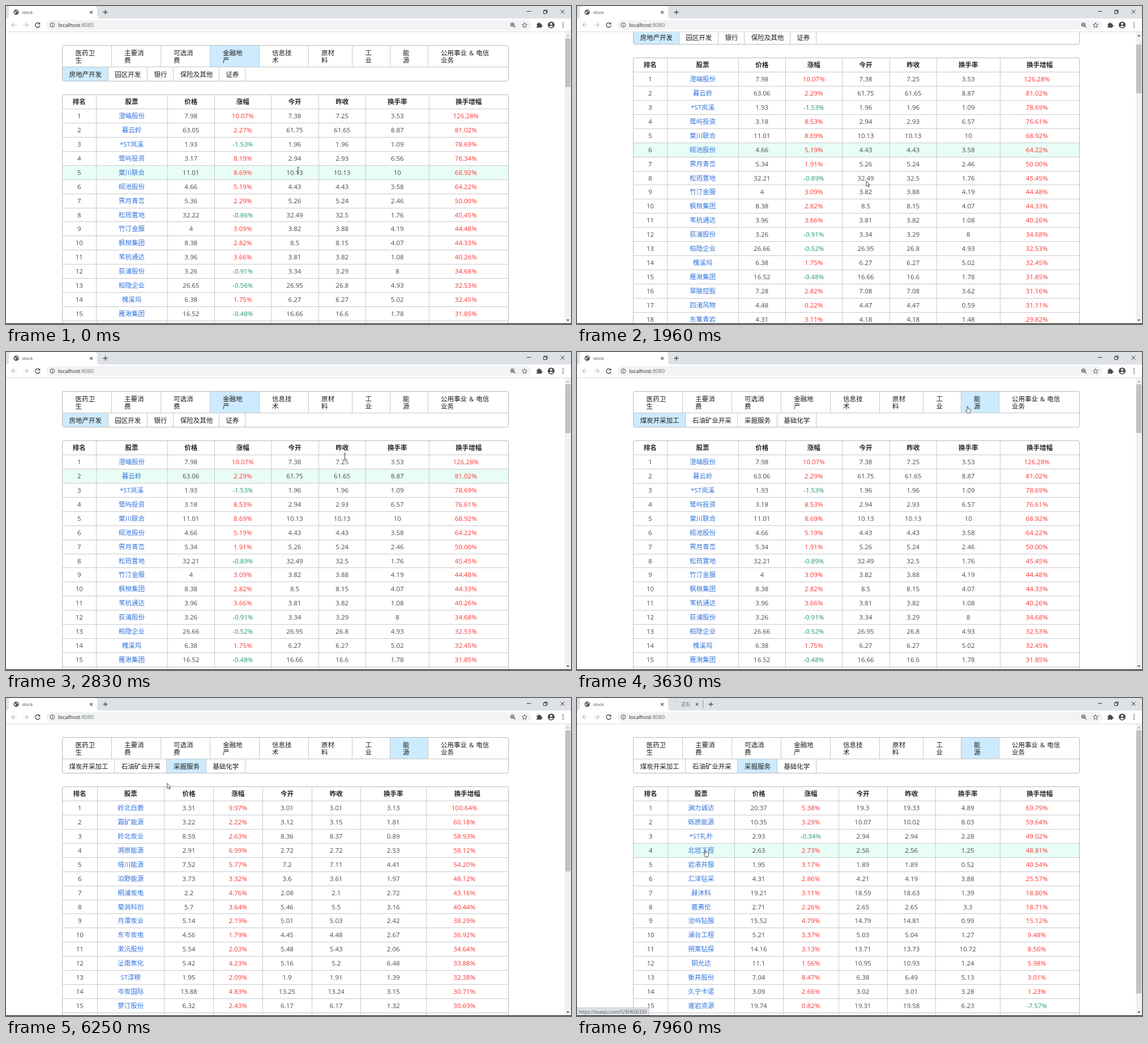
Write an HTML page that moves like this. It is 998 px wide and 561 px high and loops after 8000 ms.

```html
<!DOCTYPE html>
<html lang="zh-CN">
<head>
<meta charset="utf-8">
<title>stock</title>
<style>
html, body { margin: 0; width: 100%; height: 100%; overflow: hidden; background: #fff; }
* { box-sizing: border-box; }
#stage { position: absolute; left: 0; top: 0; width: 998px; height: 561px; overflow: hidden; background: #fff;
  font: 11.5px/24px "Open Sans", "Noto Sans CJK SC", "Noto Sans CJK", sans-serif; color: #4a4a4a; white-space: nowrap; }
#stage > *, #page > *, .panel { position: absolute; }
svg { left: 0; top: 0; overflow: visible; }
#view { left: 0; top: 46px; width: 987px; height: 514px; overflow: hidden; }
#page { position: absolute; left: 0; top: -46px; width: 987px; height: 700px; }
#nav, .panel { left: 99px; width: 789px; border: 1px solid #b9b9b9; border-radius: 3px; overflow: hidden; }
#nav { top: 69px; height: 64px; color: #1c1c1c; }
#tabs { display: grid; height: 38px; border-bottom: 1px solid #c6c6c6; line-height: 13px; word-spacing: 1px; }
#tabs div { padding: 6px 0 0 22.5px; border-right: 1px solid #c6c6c6; }
#tabs div:last-child { border: 0; }
.subs { display: flex; height: 24px; line-height: 25px; }
.subs div { padding: 0 11.6px; box-shadow: inset -1px 0 #c6c6c6; }
#nav .on { background: #cdebff; }
.panel { top: 156px; height: 520px; }
.row { display: grid; height: 24.94px; border-bottom: 1px solid #cacaca; text-align: center; }
.row div { border-right: 1px solid #cacaca; }
.row div:last-child { border: 0; }
.row.hover { background: #e8fdf6; }
.head { font-weight: 700; color: #262626; }
.row:not(.head) div:last-child { padding-right: 10px; }
.link { color: #3273dc; }
.up { color: #ff3333; }
.down { color: #209869; }
#bar { left: 987px; top: 46px; width: 11px; height: 514px; background: #f1f1f1; }
#thumb { position: absolute; left: 1px; width: 9px; background: #c1c1c1; }
#status { left: 0; top: 546px; width: 128px; height: 14px; padding-left: 3px; background: #dee1e6;
  border: solid #c3c6ca; border-width: 1px 1px 0 0; border-radius: 0 3px 0 0; font-size: 8.1px; line-height: 13px; color: #50545a; }
#floor { left: 0; top: 560px; width: 998px; height: 1px; background: #000; }
#fresh { left: 163px; top: 4px; height: 14px; overflow: hidden; border-right: 1px solid #8b8f94; }
#fresh span { position: absolute; left: 21px; width: 19px; overflow: hidden; font-size: 8.3px; line-height: 14px; color: #50545a;
  -webkit-mask: linear-gradient(90deg, #000 55%, transparent); mask: linear-gradient(90deg, #000 55%, transparent); }
#fresh svg { position: absolute; }
</style>
</head>
<body>
<div id="stage">
  <div id="view"><div id="page">
    <div id="nav"><div id="tabs"></div></div>
  </div></div>
  <div id="bar"><div id="thumb"></div></div>

  <svg width="998" height="561" fill="none" stroke="#45494d" stroke-width="1.1">
    <g stroke="none">
      <path d="M0 0H998V22H0Z" fill="#dee1e6"/>
      <path d="M0 22Q5 22 5 17V5Q5 0 10 0H156Q161 0 161 5V17Q161 22 166 22V46H0Z" fill="#fff"/>
      <path d="M0 22H998V45H0Z" fill="#fff"/>
      <path d="M0 45H998V46H0Z" fill="#d9dbde"/>
      <rect x="71" y="25" width="857" height="17" rx="8.5" fill="#f1f3f4"/>
      <circle cx="18" cy="11" r="4.7" fill="#565a5f"/>
      <path d="M14.5 9.5Q17 9 17.5 11T15.5 13.5ZM18 7.5Q21 8 21.3 10.5L19 10Z" fill="#e6e8ea"/>
      <text x="28.5" y="14" font-size="7.9" fill="#45494d">stock</text>
      <text x="92" y="37" font-size="9.35" fill="#202124">localhost<tspan fill="#6b7075">:8080</tspan></text>
    </g>
    <path d="M148.3 9l4.6 4.6M152.9 9l-4.6 4.6"/>
    <path id="plus" d="M-4 0H4M0 -4V4" stroke-width="1.3"/>
    <path d="M920 9.5h7.5M949.5 8.5h5v5h-5ZM951 8.5V7h5v5h-1.5M979.5 6.5l7 7M986.5 6.5l-7 7" stroke="#333" stroke-width="1"/>
    <path d="M18.5 33.5H10M14 29.5l-4 4 4 4M30.5 33.5H39M35 29.5l4 4-4 4" stroke="#bcbfc3"/>
    <path d="M59.3 31.2A4.1 4.1 0 1 0 60 34.5" stroke-width="1.3"/>
    <path d="M60.3 28.8V32.6H56.5Z" fill="#45494d" stroke="none"/>
    <circle cx="81.8" cy="33.5" r="3.9" stroke-width="1"/>
    <path d="M81.8 33V35.8M81.8 31.1V32.1"/>
    <circle cx="894.5" cy="32.7" r="3"/>
    <path d="M896.7 34.9l3 3M893 32.7h3M894.5 31.2v3"/>
    <path d="M916 29.3l1.3 2.8 3.1.4-2.3 2.1.6 3.1-2.7-1.5-2.7 1.5.6-3.1-2.3-2.1 3.1-.4Z" stroke-width=".9"/>
    <g fill="#45494d" stroke="none">
      <path d="M937.5 31h2.7a1.5 1.5 0 1 1 2.9 0h2.4v2.5a1.5 1.5 0 1 1 0 2.8v2.2h-2.6a1.4 1.4 0 0 0-2.7 0h-2.7v-2.6a1.4 1.4 0 0 0 0-2.7Z"/>
      <circle cx="963" cy="33.5" r="6"/>
      <circle cx="984" cy="29.8" r="1"/><circle cx="984" cy="33.5" r="1"/><circle cx="984" cy="37.2" r="1"/>
      <g fill="#fff"><circle cx="963" cy="31.6" r="2"/><path d="M959.2 36.6Q963 33 966.8 36.6Q963 39.5 959.2 36.6Z"/></g>
      <path id="upArrow" d="M990 53.5h5l-2.5-3Z"/>
      <path d="M990 553h5l-2.5 3Z"/>
    </g>
  </svg>

  <div id="fresh"><span>正在加载</span>
    <svg width="60" height="14" fill="none" stroke="#45494d">
      <path d="M9 2.5Q10 1.7 11 1.8" stroke="#8b8f94"/>
      <path id="freshClose" d="M46.7 4.7l4.6 4.6M51.3 4.7l-4.6 4.6" stroke-width="1.1"/>
    </svg>
  </div>
  <div id="status"></div>
  <div id="floor"></div>
  <svg width="998" height="561"><g id="cursor" stroke-linejoin="round">
    <path data-kind="arrow" d="M0 0V9L2.1 7.1 3.6 10.5 5 9.9 3.6 6.6H6.3Z" fill="#fff" stroke="#222" stroke-width=".8"/>
    <path data-kind="text" d="M-2 -5H2M0 -5V5M-2 5H2" fill="none" stroke="#333" stroke-width=".9"/>
    <path data-kind="hand" d="M-.9 .8Q0 -.4 .9 .8V4.5Q2 3.8 2.6 4.8 3.6 4.3 4 5.3 5.2 5 5.3 6.2V9Q5 10.5 4.3 12.5H-.6Q-1.8 9.8 -3.2 7.8-3 6.4-.9 7.9Z" fill="#fff" stroke="#222" stroke-width=".8"/>
  </g></svg>
</div>

<script>
const $ = id => document.getElementById(id);
const LEFT = 100, TOP = 181, PITCH = 24.94, FRAMES = 192;

const tabNames = ['医药卫|生', '主要消|费', '可选消|费', '金融地|产', '信息技|术', '原材|料', '工|业', '能|源', '公用事业 &amp; 电信|业务'];
const tabEdges = [186.5, 273.5, 360.5, 447.5, 534.5, 612, 678.5, 745.5, 887];
const subNames = ['房地产开发 园区开发 银行 保险及其他 证券', '煤炭开采加工 石油矿业开采 采掘服务 基础化学'];
const heads = '排名 股票 价格 涨幅 今开 昨收 换手率 换手增幅'.split(' ');

// Each row: name, price, open, previous close, turnover, turnover growth; "a>b" is a live update.
const estate = `澄岫股份 7.98 7.38 7.25 3.53 126.28
暮云岭 63.05>63.06 61.75 61.65 8.87 81.02
*ST岚溪 1.93 1.96 1.96 1.09 78.69
鹭屿投资 3.17>3.18 2.94 2.93 6.56>6.57 76.34>76.61
棠川联合 11.01 10.13 10.13 10 68.92
砚池股份 4.66 4.43 4.43 3.58 64.22
霁月青峦 5.36>5.34 5.26 5.24 2.46 50.00
松筠置地 32.22>32.21 32.49 32.5 1.76 45.45
竹汀金服 4 3.82 3.88 4.19 44.48
枫桓集团 8.38 8.5 8.15 4.07 44.33
苇杭通达 3.96 3.81 3.82 1.08 40.26
荻浦股份 3.26 3.34 3.29 8 34.68
柏隐企业 26.65>26.66 26.95 26.8 4.93 32.53
槐溪坞 6.38 6.27 6.27 5.02 32.45
雁湫集团 16.52 16.66 16.6 1.78 31.85
翠陂控股 7.28 7.08 7.08 3.62 31.16
四渚风物 4.48 4.47 4.47 0.59 31.11
东篱青岩 4.31 4.18 4.18 1.48 29.82`;
const coal = `岭北白鹿 3.31 3.01 3.01 3.13 100.64
霜矿能源 3.22 3.12 3.15 1.81 60.18
岭北炭业 8.59 8.36 8.37 0.89 58.93
溯原能源 2.91 2.72 2.72 2.53 58.12
绮川能源 7.52 7.2 7.11 4.41 54.20
泊野能源 3.73 3.6 3.61 1.97 48.12
桐浦炭电 2.2 2.08 2.1 2.72 43.16
菊涧科创 5.7 5.46 5.5 3.16 40.44
月潭炭业 5.14 5.01 5.03 2.42 38.29
东岑炭电 4.56 4.45 4.48 2.67 36.92
漱沅股份 5.54 5.48 5.43 2.06 34.64
沚南焦化 5.42 5.16 5.2 6.48 33.88
ST淳穆 1.95 1.9 1.91 1.39 32.38
岑炭国际 13.88 13.25 13.24 3.15 30.71
蓼汀股份 6.32 6.17 6.17 1.32 30.69`;
const drilling = `渊力诚达 20.37 19.3 19.33 4.89 69.79
砾原能源 10.35 10.07 10.02 8.03 59.64
*ST礼朴 2.93 2.94 2.94 2.28 49.02
北垣工程 2.63 2.56 2.56 1.25 48.81
岩液井服 1.95 1.89 1.89 0.52 40.54
汇泽钻采 4.31 4.21 4.19 3.88 25.57
赫沐科 19.21 18.59 18.63 1.39 18.80
嘉弗伦 2.71 2.65 2.65 3.3 18.71
沧屿钻服 15.52 14.79 14.81 0.99 15.12
澜台工程 5.21 5.03 5.04 1.27 9.48
朔莱钻探 14.16 13.71 13.73 10.72 8.50
铜允达 11.1 10.95 10.93 1.24 5.98
衡井股份 7.04 6.38 6.49 5.13 3.01
久宁卡诺 3.09 3.02 3.01 3.28 1.23
邃岩资源 19.74 19.31 19.58 6.23 -7.57`;
const estateEdges = [159.5, 285.5, 369, 468.5, 552.5, 636, 747.5, 887];
const coalEdges = [161.5, 280, 367, 453.5, 540.5, 627, 742.5, 887];
const drillingEdges = [161, 278.5, 364.5, 462.5, 548.5, 634, 747.5, 887];

const columns = edges => edges.map((e, i) => e - (edges[i - 1] || LEFT) + 'px').join(' ');

function add(parent, cls, html = '') {
  const el = document.createElement('div');
  el.className = cls;
  el.innerHTML = html;
  return parent.appendChild(el);
}

function makeTable(text, edges, updated) {
  const panel = add($('page'), 'panel');
  const addRow = (cells, cls) => {
    const row = add(panel, cls);
    row.style.gridTemplateColumns = columns(edges);
    cells.forEach(([value, kind]) => add(row, kind || '', value));
    return row;
  };
  const tint = v => [v + '%', v < 0 ? 'down' : 'up'];
  const head = addRow(heads.map(h => [h]), 'row head');
  const rows = text.split('\n').map((line, i) => {
    const [name, price, open, prev, turn, growth] =
      line.split(' ').map(v => v.split('>')[updated && v.includes('>') ? 1 : 0]);
    const change = ((price / prev - 1) * 100).toFixed(2);
    return addRow([[i + 1], [name, 'link'], [price], tint(change), [open], [prev], [turn], tint(growth)], 'row');
  });
  addRow(heads.map(() => ['']), 'row');
  return { panel, head, rows, edges };
}

const tables = [
  makeTable(estate, estateEdges, false),
  makeTable(estate, estateEdges, true),
  makeTable(coal, coalEdges),
  makeTable(drilling, drillingEdges)
];
const thumbHeights = [86, 86, 249, 464];

$('tabs').style.gridTemplateColumns = columns(tabEdges);
const tabs = tabNames.map(n => add($('tabs'), '', n.replace('|', '<br>')));
const subs = subNames.map(names => {
  const bar = add($('nav'), 'subs');
  names.split(' ').forEach(n => add(bar, '', n));
  return bar;
});

// Pointer path: frame (24 per second), x, y
const path = [
  [0, 516, 290], [9, 516, 290], [13, 513, 291], [16, 513, 291], [19, 511, 307], [22, 511, 308.8],
  [60, 511, 308.8], [64, 548, 245], [66, 575, 212], [68, 598.5, 184], [77, 708, 92], [83, 706, 90],
  [86, 706, 90], [95, 560, 140], [106, 328, 178], [109, 324, 180.7], [118, 296, 200], [126, 248, 220],
  [129, 226, 219], [133, 226, 219], [142, 316, 124], [145, 305, 124], [147, 305, 124],
  [150, 284.7, 150.5], [167, 252, 242], [180, 227, 267.5]
];

function pointer(f) {
  const i = path.findIndex(k => k[0] > f);
  if (i < 0) return path[path.length - 1].slice(1);
  if (i === 0) return path[0].slice(1);
  const [f0, x0, y0] = path[i - 1], [f1, x1, y1] = path[i];
  const p = (f - f0) / (f1 - f0);
  return [x0 + (x1 - x0) * p, y0 + (y1 - y0) * p];
}

const ease = p => { p = Math.min(1, Math.max(0, p)); return p * p * (3 - 2 * p); };
const scrollAt = f => 65 * (ease((f - 41) / 6) - ease((f - 57) / 6));
// Hover is only re-evaluated some time after the wheel stops.
const settledScroll = f => f >= 54 && f < 64 ? 65 : 0;
const rowAt = (y, f) => Math.floor((y + settledScroll(f) - TOP) / PITCH);

function pointerKind(f, table) {
  const [x, y] = pointer(f - 1);
  if (y > 69 && y < 133) return 'hand';
  const r = rowAt(y, f);
  const row = r === -1 ? table.head : table.rows[r];
  if (!row) return 'arrow';
  const c = table.edges.findIndex(e => e > x);
  if (c < 0) return 'arrow';
  const half = row.children[c].textContent.replace(/[^\x00-\xff]/g, 'aa').length * 2.9;
  const midX = ((table.edges[c - 1] || LEFT) + table.edges[c]) / 2;
  const midY = TOP + (r + .5) * PITCH - settledScroll(f);
  if (Math.abs(x - midX) > half || Math.abs(y - midY) > 8) return 'arrow';
  return c === 1 && r >= 0 ? 'hand' : 'text';
}

const show = (el, on) => { el.style.visibility = on ? 'visible' : 'hidden'; };

function draw(f) {
  const current = f < 31 ? 0 : f < 96 ? 1 : f < 155 ? 2 : 3;
  const table = tables[current];
  tables.forEach(t => { t.panel.style.display = t === table ? '' : 'none'; });

  const group = f < 79 ? 0 : 1;
  tabs.forEach((t, i) => { t.className = i === (group ? 7 : 3) ? 'on' : ''; });
  subs.forEach((bar, i) => {
    bar.style.display = i === group ? '' : 'none';
    [...bar.children].forEach((s, j) => { s.className = j === (f < 143 ? 0 : 2) ? 'on' : ''; });
  });

  const scroll = scrollAt(f);
  $('page').style.transform = `translateY(${-scroll}px)`;
  $('thumb').style.top = 11 + scroll * 10.5 / 65 + 'px';
  $('thumb').style.height = thumbHeights[current] + 'px';
  $('upArrow').setAttribute('fill', scroll > 0 ? '#45494d' : '#a3a3a3');

  const hover = rowAt(pointer(f - 2)[1], f);
  table.rows.forEach((r, i) => r.classList.toggle('hover', i === hover));

  const [x, y] = pointer(f), kind = pointerKind(f, table);
  $('cursor').setAttribute('transform', `translate(${x} ${y})`);
  for (const shape of $('cursor').children) show(shape, shape.dataset.kind === kind);
  show($('status'), kind === 'hand' && y > TOP);
  $('status').textContent = 'https://xueqiu.com/S/SH' + (current < 3 ? '600792' : '600339');

  const tabWidth = f < 190 ? 0 : f === 190 ? 30 : 60;
  show($('fresh'), tabWidth);
  show($('freshClose'), tabWidth === 60);
  $('fresh').style.width = tabWidth + 'px';
  $('plus').setAttribute('transform', `translate(${tabWidth ? 176.5 + tabWidth : 175.5} 11)`);
}

let last = -1;
function tick() {
  const f = Math.floor(performance.now() % 8000 * .024 + .13) % FRAMES;
  if (f !== last) draw(last = f);
  requestAnimationFrame(tick);
}
tick();
</script>
</body>
</html>
```
